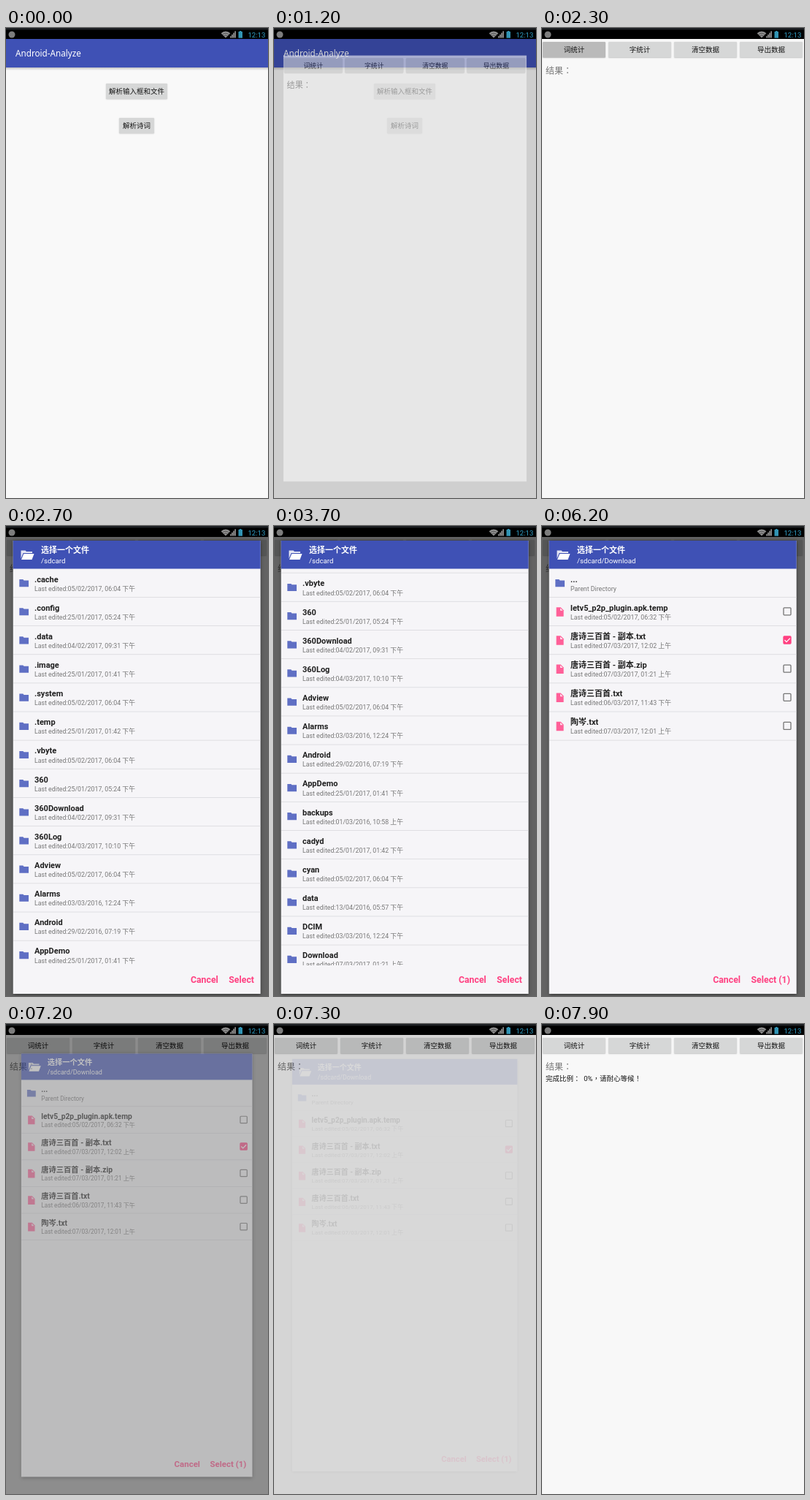
Animation, 359 px wide and 643 px high, one loop 8000 ms. Source, as an HTML page with a canvas:

```html
<!DOCTYPE html>
<html lang="zh-CN">
<head>
<meta charset="utf-8">
<title>Android-Analyze</title>
<style>
html, body { margin: 0; width: 100%; height: 100%; overflow: hidden; background: #000; }
canvas { display: block; width: 359px; height: 643px; }
</style>
</head>
<body>
<canvas id="stage"></canvas>
<script>
const W = 359, H = 643, LOOP = 8000;
const DPR = window.devicePixelRatio || 1;
const SANS = 'Roboto, "Noto Sans CJK SC", "Noto Sans CJK", sans-serif';
const PUNCT = '"Noto Sans CJK TC", "Noto Sans CJK SC", sans-serif';
const BLUE = '#3f51b5', PINK = '#ff4081', PAPER = '#f6f5f8';
const ROW = 39.15, LIST_TOP = 58, LIST_END = 601;

const sdcard = `.cache|05/02/2017, 06:04 下午
.config|25/01/2017, 05:24 下午
.data|04/02/2017, 09:31 下午
.image|25/01/2017, 01:41 下午
.system|05/02/2017, 06:04 下午
.temp|25/01/2017, 01:42 下午
.vbyte|05/02/2017, 06:04 下午
360|25/01/2017, 05:24 下午
360Download|04/02/2017, 09:31 下午
360Log|04/03/2017, 10:10 下午
Adview|05/02/2017, 06:04 下午
Alarms|03/03/2016, 12:24 下午
Android|29/02/2016, 07:19 下午
AppDemo|25/01/2017, 01:41 下午
backups|01/03/2016, 10:58 上午
cadyd|25/01/2017, 01:42 下午
cyan|05/02/2017, 06:04 下午
data|13/04/2016, 05:57 下午
DCIM|03/03/2016, 12:24 下午
Download|07/03/2017, 01:21 上午
files|05/02/2017, 06:04 下午
fonts|25/01/2017, 01:42 下午
Log|04/03/2017, 10:10 下午
Movies|03/03/2016, 12:24 下午
Music|03/03/2016, 12:24 下午`.split('\n').map(line => line.split('|'));

const downloads = `...|
letv5_p2p_plugin.apk.temp|05/02/2017, 06:32 下午
唐诗三百首 - 副本.txt|07/03/2017, 12:02 上午
唐诗三百首 - 副本.zip|07/03/2017, 01:21 上午
唐诗三百首.txt|06/03/2017, 11:43 下午
陶岑.txt|07/03/2017, 12:01 上午`.split('\n').map(line => line.split('|'));

function makeCanvas(el) {
  el.width = Math.round(W * DPR);
  el.height = Math.round(H * DPR);
  const ctx = el.getContext('2d');
  ctx.setTransform(DPR, 0, 0, DPR, 0, 0);
  return ctx;
}
const main = makeCanvas(document.getElementById('stage'));
const layer = makeCanvas(document.createElement('canvas'));
let g = main;

function rect(x, y, w, h, color) {
  g.fillStyle = color;
  g.fillRect(x, y, w, h);
}

function path(color, points) {
  g.fillStyle = color;
  g.beginPath();
  points.forEach(([x, y]) => g.lineTo(x, y));
  g.closePath();
  g.fill();
}

function text(str, x, y, size, color, { weight = 400, align = 'left', family = SANS } = {}) {
  g.font = `${weight} ${size}px ${family}`;
  g.fillStyle = color;
  g.textAlign = align;
  g.fillText(str, x, y);
}

// Full-width punctuation sits in the middle of its cell.
function mixedText(str, x, y, size, color) {
  for (const part of str.split(/([：，！])/)) {
    text(part, x, y, size, color, { family: /^[：，！]$/.test(part) ? PUNCT : SANS });
    x += g.measureText(part).width;
  }
}

function button(label, x, y, w, h, color = '#d6d7d7') {
  g.save();
  g.shadowColor = 'rgba(0,0,0,.22)';
  g.shadowBlur = 1.5 * DPR;
  g.shadowOffsetY = 0.5 * DPR;
  g.fillStyle = color;
  g.beginPath();
  g.roundRect(x, y, w, h, 1.2);
  g.fill();
  g.restore();
  text(label, x + w / 2, y + h / 2 + 3.5, 9.5, '#151515', { align: 'center' });
}

function statusBar() {
  rect(0, 0, W, 15, '#000');
  rect(0, 0, W, 2.5, '#1d2023');
  g.fillStyle = '#7d7d7d';
  g.beginPath();
  g.arc(8, 9, 4.5, 0, 7);
  g.fill();
  g.fillStyle = '#8f8f8f';
  g.beginPath();
  g.moveTo(301, 13.5);
  g.arc(301, 13.5, 9, -Math.PI * 0.75, -Math.PI * 0.25);
  g.fill();
  g.strokeStyle = '#333';
  g.lineWidth = 0.6;
  for (const r of [3.5, 6.3]) {
    g.beginPath();
    g.arc(301, 13.5, r, -Math.PI * 0.75, -Math.PI * 0.25);
    g.stroke();
  }
  for (let i = 0; i < 4; i++) {
    const h = 2.3 * (i + 1);
    rect(307 + i * 2.1, 13.5 - h, 1.7, h, '#8f8f8f');
  }
  rect(318.5, 5, 5.5, 8.7, '#3295b5');
  rect(320, 4, 2.5, 1, '#3295b5');
  text('12:13', 355.5, 13.2, 9.7, '#2f9dc4', { align: 'right' });
}

function homeScreen() {
  rect(0, 15, W, H - 15, '#f9f9f9');
  const shade = g.createLinearGradient(0, 54, 0, 58);
  shade.addColorStop(0, 'rgba(0,0,0,.22)');
  shade.addColorStop(1, 'rgba(0,0,0,0)');
  rect(0, 54, W, 4, shade);
  rect(0, 15, W, 39, BLUE);
  text('Android-Analyze', 13, 39, 11.7, '#fff', { family: '"Noto Sans", "Open Sans", sans-serif' });
  button('解析输入框和文件', 137, 76, 84, 21);
  button('解析诗词', 155, 123, 48, 21);
}

function resultScreen(pressed, progress) {
  rect(0, 15, W, H - 15, '#f8f8f8');
  ['词统计', '字统计', '清空数据', '导出数据'].forEach((label, i) =>
    button(label, 1 + i * 90, 19, 86, 21.5, pressed && !i ? '#bababa' : undefined));
  mixedText('结果：', 5, 63, 12, '#757575');
  if (progress) mixedText('完成比例：  0%，请耐心等候！', 5, 77.5, 9.5, '#111');
}

function folderIcon(y) {
  path('#5f6fc4', [[18.3, y - 5], [23.3, y - 5], [24.6, y - 3.6], [31, y - 3.6], [31, y + 5.2], [18.3, y + 5.2]]);
}

function fileIcon(y) {
  path('#ff5f98', [[19.6, y - 6], [25.6, y - 6], [29.6, y - 2], [29.6, y + 6.5], [19.6, y + 6.5]]);
  path('#ffe3ee', [[25, y - 5], [28.6, y - 1.4], [25, y - 1.4]]);
}

function checkbox(y, checked) {
  g.lineWidth = 1.3;
  g.beginPath();
  g.roundRect(331, y - 5, 10, 10, 1);
  g.strokeStyle = checked ? PINK : '#757575';
  g.stroke();
  if (!checked) return;
  g.fillStyle = PINK;
  g.fill();
  g.strokeStyle = '#fff';
  g.beginPath();
  g.moveTo(332.5, y);
  g.lineTo(335, y + 2.6);
  g.lineTo(339.8, y - 2.4);
  g.stroke();
}

function fileRow([name, date], y, isFolder, pressed, checked) {
  if (pressed) rect(10, y, 338.5, ROW, '#dcdbde');
  rect(10, y + ROW - 0.2, 338.5, 0.9, '#dcdce0');
  (isFolder ? folderIcon : fileIcon)(y + 20);
  text(name, 39, y + 18.5, 11, '#1f1f1f', { weight: 700 });
  text(date ? 'Last edited:' + date : 'Parent Directory', 39, y + 30.6, 8.8, '#777');
  if (!isFolder) checkbox(y + 19.7, checked);
}

function dialog({ inDownloads, scroll, bar, pressedRow, checked }) {
  g.save();
  g.shadowColor = 'rgba(0,0,0,.5)';
  g.shadowBlur = 5 * DPR;
  g.shadowOffsetY = DPR;
  rect(9.7, 20, 339, 620, PAPER);
  g.restore();

  g.save();
  g.beginPath();
  g.rect(9.7, LIST_TOP, 339, LIST_END - LIST_TOP);
  g.clip();
  (inDownloads ? downloads : sdcard).forEach((item, i) => {
    const y = LIST_TOP + i * ROW - scroll;
    if (y > -ROW && y < LIST_END)
      fileRow(item, y, !inDownloads || i === 0, i === pressedRow, checked && i === 2);
  });
  if (bar) rect(344, 62.5 + scroll * 0.3297, 2, 179, `rgba(0,0,0,${0.4 * bar})`);
  g.restore();

  rect(9.7, 20, 339, 38.5, BLUE);
  path('#e4e6f4', [[20.5, 33.5], [26.5, 33.5], [28, 35], [36, 35], [36, 37], [23.5, 37], [20.5, 44.5]]);
  path('#fff', [[24.3, 38], [38.5, 38], [35.5, 46], [21, 46]]);
  text('选择一个文件', 48, 37, 11, '#fff', { weight: 700 });
  text(inDownloads ? '/sdcard/Download' : '/sdcard', 48, 51, 9.7, '#fff');
  const select = checked ? 'Select (1)' : 'Select';
  const bold = { weight: 700, align: 'right' };
  text(select, 340, 625.3, 12.3, PINK, bold);
  text('Cancel', 325.5 - g.measureText(select).width, 625.3, 12.3, PINK, bold);
}

// Draws a window scaled about its centre with one opacity for the whole.
function windowLayer(draw, scale, alpha, cx, cy) {
  g = layer;
  g.clearRect(0, 0, W, H);
  g.save();
  g.translate(cx, cy);
  g.scale(scale, scale);
  g.translate(-cx, -cy);
  draw();
  g.restore();
  g = main;
  g.globalAlpha = alpha;
  g.drawImage(layer.canvas, 0, 0, W, H);
  g.globalAlpha = 1;
}

function dim(amount) {
  rect(0, 15, W, H - 15, `rgba(0,0,0,${amount})`);
}

// Each entry: time, scale, opacity, dim.
const dialogPose = [
  [2500, 0.95, 0.5, 0.3], [2600, 0.99, 0.92, 0.54], [2700, 1, 1, 0.6],
  [7200, 0.934, 0.45, 0.43], [7300, 0.91, 0.1, 0.14], [7400, 0.9, 0, 0]
];
const scrollSteps = [[0, 0], [3200, 130], [3300, 229], [3900, 330], [4000, 387]];
const barSteps = [[0, 0], [3200, 1], [3600, 0.5], [3700, 0], [3900, 1], [4300, 0.5], [4400, 0]];

const at = (steps, t) => steps.filter(step => step[0] <= t).pop();

function draw(t) {
  g = main;
  if (t < 1400) {
    homeScreen();
    if (t >= 1200) {
      const late = t >= 1300;
      dim(late ? 0.25 : 0.17);
      windowLayer(() => resultScreen(), late ? 0.988 : 0.928, late ? 0.95 : 0.6, W / 2, 329);
    }
  } else {
    resultScreen(t >= 2300 && t < 2500, t >= 7900);
    const pose = at(dialogPose, t);
    if (pose && pose[2]) {
      const inDownloads = t >= 4900;
      const state = {
        inDownloads,
        scroll: inDownloads ? 0 : at(scrollSteps, t)[1],
        bar: inDownloads ? 0 : at(barSteps, t)[1],
        pressedRow: t === 4800 ? 19 : t === 6100 ? 2 : -1,
        checked: t >= 6100
      };
      dim(pose[3]);
      windowLayer(() => dialog(state), pose[1], pose[2], 179.2, 330);
    }
  }
  statusBar();
}

const start = performance.now();
function tick() {
  const t = (performance.now() - start) % LOOP;
  draw(Math.floor(t / 100) * 100);
  requestAnimationFrame(tick);
}
tick();
</script>
</body>
</html>
```
